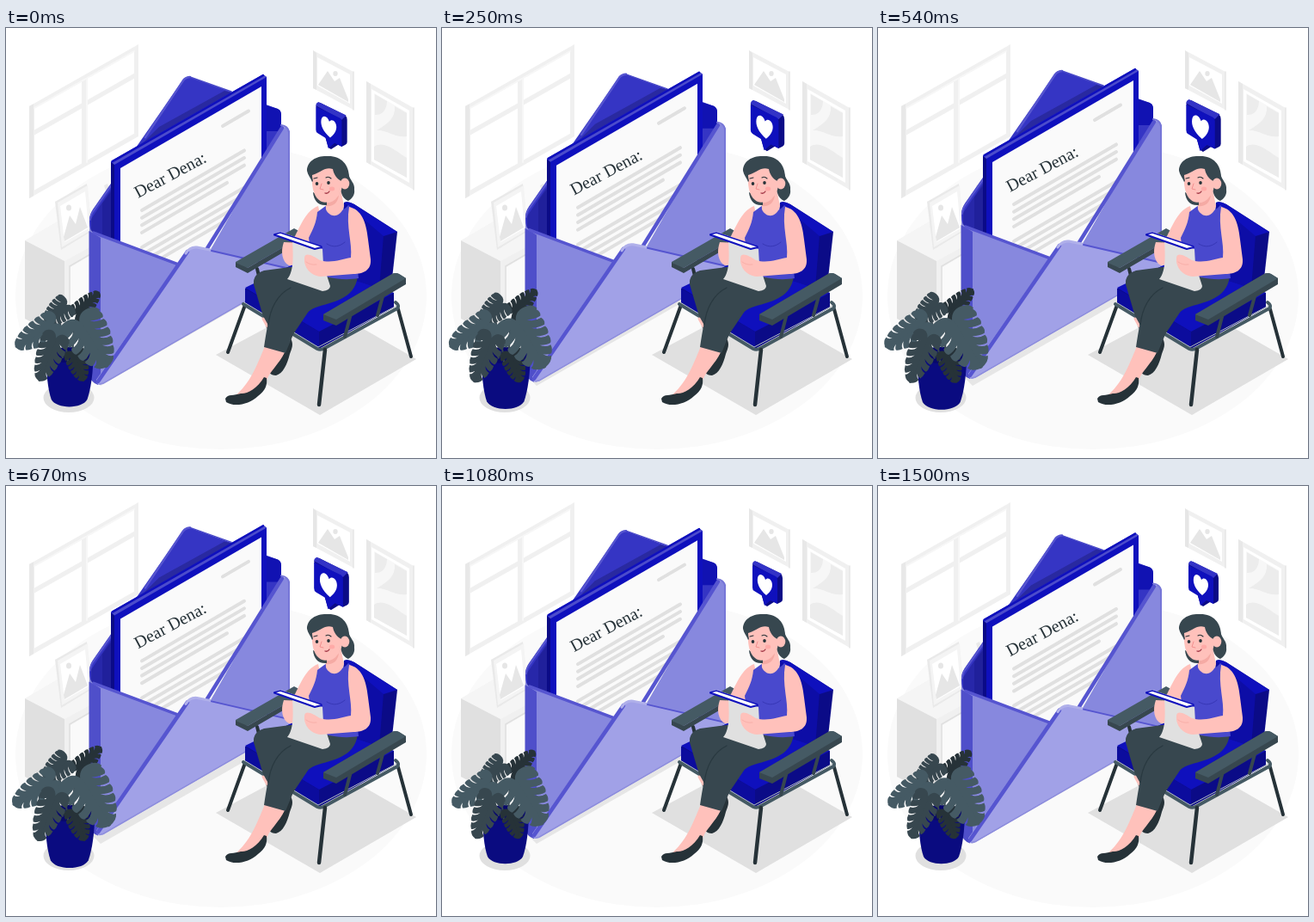
Animation, 500 px wide and 500 px high, one loop 1540 ms. Source, as an HTML page with a canvas:

```html
<!DOCTYPE html>
<html lang="en">
<head>
<meta charset="utf-8">
<title>Letter from an envelope</title>
<style>
  html, body { margin: 0; width: 100%; height: 100%; overflow: hidden; background: #fff; }
  canvas { display: block; }
</style>
</head>
<body>
<canvas id="stage" width="500" height="500"></canvas>
<script>
const ctx = document.getElementById('stage').getContext('2d');
const LOOP = 1540, PHASE = 40;
const SLATE = '#37474f', STEEL = '#455a64', INK = '#263238', SKIN = '#ffc1bb';
const BLUE = '#0f10bd', NAVY = '#0b0b87', EDGE = '#5655d0', PALE = '#8788de';
const GREY = '#e0e0e0', MIST = '#f0f0f0', PAPER = '#fafafa';

function fill(d, color) {
  ctx.fillStyle = color;
  ctx.fill(new Path2D(d));
}
function line(d, color, width) {
  ctx.strokeStyle = color;
  ctx.lineWidth = width;
  ctx.lineCap = ctx.lineJoin = 'round';
  ctx.stroke(new Path2D(d));
}
function oval(x, y, rx, ry, color) {
  ctx.fillStyle = color;
  ctx.beginPath();
  ctx.ellipse(x, y, rx, ry, 0, 0, Math.PI * 2);
  ctx.fill();
}
function moved(x, y, draw) {
  ctx.save();
  ctx.translate(x, y);
  draw();
  ctx.restore();
}
function scaled(x, y, k, draw) {
  ctx.save();
  ctx.translate(x, y);
  ctx.scale(k, k);
  ctx.translate(-x, -y);
  draw();
  ctx.restore();
}

// Wall panel whose horizontal edges rise at the isometric slope.
function panel(x0, x1, top, bottom, color) {
  const y = (x, base) => base - 0.567 * (x - 27);
  fill(`M${x0} ${y(x0, top)}L${x1} ${y(x1, top)}V${y(x1, bottom)}L${x0} ${y(x0, bottom)}Z`, color);
}

function room() {
  ctx.fillStyle = '#fff';
  ctx.fillRect(0, 0, 500, 500);
  oval(250, 312, 239, 178, PAPER);

  panel(27, 154, 91, 198, MIST);
  panel(27, 32, 91, 198, '#e8e8e8');
  for (const [x0, x1] of [[33, 88], [95, 149]]) {
    panel(x0, x1, 97, 122, '#fff');
    panel(x0, x1, 128, 192, '#fff');
  }
  line('M33 93L149 27M94 60V156', '#f7f7f7', 2);

  fill('M22 247L82 212L132 236L68 271Z', '#f5f5f5');
  fill('M22 247L68 271V362L22 338Z', GREY);
  fill('M68 271L132 236V340L68 362Z', MIST);
  line('M74 330V277L112 255', GREY, 1.5);
  fill('M75 278L112 256V325L75 340Z', PAPER);
  fill('M57 202L94 181L100 236L64 258Z', '#e9e9e9');
  fill('M60 203L95 183L99 235L65 255Z', '#f4f4f4');
  fill('M63 207L92 190L96 233L68 249Z', '#fff');
  fill('M67 243L74 218L81 228L86 208L95 232L68 248Z', '#e6e6e6');
  oval(73, 209, 3, 3.5, '#e6e6e6');
  fill('M114 183L118 181L124 199L120 202Z', '#e9e9e9');

  fill('M357 26L404 51V95L357 70Z', MIST);
  fill('M357 26L361 29V72L357 70Z', '#e6e6e6');
  fill('M362 34L400 54V88L362 67Z', '#fff');
  fill('M363 66L374 50L382 62L388 58L398 83V86Z', '#e6e6e6');
  oval(383, 53, 2.7, 3, '#e6e6e6');
  line('M404 51V95', '#e6e6e6', 1.5);

  fill('M419 62L474 93V188L419 156Z', MIST);
  fill('M419 62L424 65V159L419 156Z', '#e8e8e8');
  fill('M425 71L469 96V180L425 155Z', '#fff');
  fill('M428 76L466 98V174L428 153Z', '#f7f7f7');
  fill('M429 77L443 85C443 96 436 102 429 101Z', '#ececec');
  fill('M452 91L466 99V126C452 128 443 118 431 119C445 111 453 104 452 91Z', '#ececec');
  fill('M428 138C440 130 454 144 466 151V174L428 153Z', '#ececec');
  line('M474 93V188', '#e6e6e6', 1.5);

  fill('M98 404L110 416L283 317L275 300Z', '#e6e6e6');
  fill('M244 380L360 318L477 385L365 450Z', GREY);
  oval(73, 430, 29.5, 17, GREY);
}

function letter() {
  fill('M122 156Q122 154 125 153L299 54L303 57V190L210 285L122 248Z', BLUE);
  fill('M122 156L126 159V250L122 248Z', NAVY);
  fill('M122 155L299 54L303 57L126 159Z', '#4c4ccc');
  line('M124 155L299 55', BLUE, 2.5);
  fill('M133 163L297 68V230L225 290L133 252Z', PAPER);
  line('M252 114L282 96.5', GREY, 4);
  for (let row = 0; row < 9; row++) {
    if (row === 4) continue;
    const y = 212 + row * 8.6;
    const end = row === 3 ? 257 : 277;
    line(`M158 ${y}L${end} ${y - (end - 158) * 0.585}`, GREY, 4);
  }
  ctx.save();
  ctx.translate(153.5, 198);
  ctx.rotate(-28 * Math.PI / 180);
  ctx.font = '20px "Liberation Serif", "Times New Roman", serif';
  ctx.fillStyle = INK;
  ctx.fillText('Dear Dena:', 0, 0);
  ctx.restore();
}

function envelope() {
  fill('M97 224Q97 217 101 211L206 60Q209 56 214 57L316 94Q320 96 320 101V180L215 290L97 245Z', '#3535c4');
  line('M162 127L206 61Q209 57 214 57', EDGE, 2.5);
  line('M214 57L262 74', '#4949c8', 1.5);
  fill('M155 138L178 115L254 73L266 76L303 92V170H155Z', '#2929a0');
  fill('M303 90L316 94Q320 96 320 101V120H303Z', '#1112b2');
  fill('M99 222L124 185V250L99 240Z', '#2727a9');
  line('M98 223Q98 217 102 212L123 182', EDGE, 2);
  fill('M112 204L124 188V249L112 243Z', '#20209b');

  letter();

  fill('M97 225Q97 236 102 238L206 277L222 300L110 414Q97 412 97 402Z', PALE);
  fill('M96.500 222V402Q98 412 107 415L110 410V244Q104 240 96.500 236Z', '#4f4fca');
  line('M102 238L201 275', EDGE, 3.5);
  fill('M319 116Q327 113 330 120V291L225 280Z', PALE);
  line('M321 116L234 256', EDGE, 4.5);
  line('M320 113Q328 114 329 121V270', '#7676d7', 2);
  fill('M209 260Q213 254 221 255L239 259L330 280V288L113 414Q105 417 105 409Z', '#a1a1e7');
  line('M211 260L107 411', EDGE, 4.5);
  line('M209 262Q214 254 222 255L237 258', '#b0b0ea', 3);
  line('M239 259L330 280', EDGE, 2);
  line('M109 414L113 413L328 289', '#8d8ddd', 1.5);
}

// Split leaf running from its base to its tip, with narrow slits along both sides.
function leaf(x0, y0, x1, y1, width, color) {
  const half = u => 0.5 * Math.sqrt(1 - u * u);
  ctx.save();
  ctx.translate(x0, y0);
  ctx.rotate(Math.atan2(y1 - y0, x1 - x0));
  ctx.scale(Math.hypot(x1 - x0, y1 - y0), width);
  ctx.fillStyle = color;
  for (const side of [-1, 1]) {
    ctx.beginPath();
    ctx.moveTo(0, -0.03 * side);
    ctx.quadraticCurveTo(-0.24, 0.05 * side, -0.2, 0.3 * side);
    ctx.quadraticCurveTo(-0.18, 0.46 * side, -0.06, half(0.06) * side);
    for (let i = 0; i < 5; i++) {
      const a = i * 0.18 - 0.04, b = a + 0.145, mid = a + 0.09;
      ctx.lineTo(a, half(a) * 0.95 * side);
      ctx.quadraticCurveTo(mid, half(mid) * 1.06 * side, b, half(b) * 0.95 * side);
      ctx.quadraticCurveTo(b, half(b) * 0.7 * side, b - 0.07, half(b) * 0.4 * side);
      ctx.quadraticCurveTo(b + 0.035, half(b) * 0.6 * side, b + 0.035, half(b + 0.035) * 0.95 * side);
    }
    ctx.quadraticCurveTo(0.97, 0.2 * side, 1, 0);
    ctx.lineTo(1, -0.03 * side);
    ctx.fill();
  }
  ctx.restore();
}

function plant() {
  fill('M47 378H101C101 400 98 420 94 431C88 442 59 442 53 431C49 420 47 400 47 378Z', '#0a0b80');
  oval(74, 380, 27, 9, '#08086b');
  line('M72 388C70 365 66 355 62 341M76 386C80 360 76 345 84 332M66 383L57 364M78 386L91 345', SLATE, 2);
  leaf(83, 332, 108, 308, 23, INK);
  leaf(69, 324, 46, 343, 30, SLATE);
  leaf(53, 346, 12, 371, 34, STEEL);
  leaf(80, 380, 90, 410, 26, INK);
  leaf(87, 345, 117, 394, 54, STEEL);
  leaf(57, 364, 39, 410, 33, SLATE);
}

function bubble() {
  fill('M361 91L366 88L394 102Q396 104 396 107V132Q396 134 394 135L390 137L386 135L378 140L375 138Z', NAVY);
  fill('M361 91Q361 88 364 87L395 102L390 107Z', '#3333c6');
  fill('M361 92L388 105Q390 106 390 109V137L382 133L375 139L372 127.500L363 122Q361 121 361 118Z', BLUE);
  fill('M377 127C369 120 366 113 367 107C368 101 374 102 376 109C379 105 384 109 384 115C384 120 381 124 377 127Z', '#fff');
}

function chair() {
  line('M278 322L258 377M292 280L296 296', INK, 4);
  line('M456 327L471 382', INK, 4);
  fill('M393 203Q398 201 405 205L455 237L447 309L430 320L388 295Z', NAVY);
  fill('M393 203L439 241L434 303L420 312L388 290Z', '#0d0da6');
  fill('M393 203Q398 201 405 205L455 237L439 242Z', BLUE);

  fill('M267 272L335 233L348 240L281 279L267 277Z', STEEL);
  fill('M267 273L281 279L348 240V246L281 285L267 278Z', SLATE);

  fill('M278 303L340 272L451 308V325L364 373L278 323Z', NAVY);
  fill('M278 302L340 272L451 308L364 353Z', BLUE);
  fill('M278 303L364 353V373L278 323Z', '#0c0c9d');
  line('M276 321L362 373Q366 375 371 372L455 326Q458 323 453 319', STEEL, 4);
  line('M277 319L363 371L454 323', '#b4bec2', 1);
  line('M371 374L364 438', INK, 4.5);
}

function armrest() {
  line('M401 332L394 359M438 312L432 334', SLATE, 4);
  fill('M369 333L449 286Q453 284 457 286L465 291V298L384 346L369 340Z', SLATE);
  fill('M369 333L449 286Q453 284 457 286L465 291L384 339Z', STEEL);
}

function legs() {
  fill('M318 360L332 360L325 388L309 394Z', SKIN);
  fill('M331 361C335 368 332 373 330 379C327 391 322 402 314 404C307 404 304 400 305 393C317 391 324 380 331 361Z', INK);
  fill('M338 277L300 282Q287 286 288 298L303 349L330 362L365 310Z', SLATE);
  line('M304 347L299 338', SKIN, 3);
  fill('M301 370L324 377C318 391 305 400 302 413L281 431L266 428C284 413 291 394 301 370Z', SKIN);
  fill('M255 431C258 425 265 428 273 425C279 426 292 420 300 406L303 407C304 415 302 421 293 428C283 438 265 441 256 435Z', INK);
  fill('M409 289C405 316 380 318 360 325C341 332 334 358 325 378L300 371C303 352 306 329 315 315C322 303 345 298 358 283Z', SLATE);
  line('M331 302C315 310 307 327 305 345', '#293940', 1.3);
}

function torso() {
  fill('M363 207C349 212 343 229 335 244L351 250C362 238 368 224 363 207Z', SKIN);
  fill('M362 214L373 206C382 216 393 213 398 206C405 211 407 230 405 250L410 291C393 294 370 291 357 283L352 244C357 234 361 226 362 214Z', '#4949cd');
  line('M373 251C381 256 388 254 394 249', '#3737b6', 1);
  fill('M371 194L372 211C377 222 390 220 393 207L389 187Z', SKIN);
  fill('M372 203C379 204 384 199 387 194C386 204 380 208 372 207Z', '#f5aaa4');

  fill('M323 249C319 260 321 272 329 276L342 275L343 250Z', SKIN);
  fill('M333 247L368 257L369 275L377 300Q377 305 368 306L327 292C335 283 334 264 333 247Z', GREY);
  fill('M311 240L319 237L368 254L360 258Z', '#fff');
  line('M312 240L319 238L367 254', BLUE, 1.5);
  line('M312 240.500L359 257L367 255', BLUE, 2);

  fill('M399 208C413 211 419 225 421 246L424 269C425 282 415 286 404 286L366 289C354 288 346 278 347 268C347 260 356 264 365 270C378 274 390 269 401 267C403 250 395 231 399 208Z', SKIN);
  line('M349 272Q354 276 361 275', '#f5aaa4', 0.8);
}

function head() {
  fill('M384 165L398 169C400 178 406 180 405 188C406 194 402 199 398 201C393 199 390 195 389 187Z', SLATE);
  fill('M357 191C358 201 363 207 373 206L373 199Z', SLATE);
  fill('M356 168C355 182 357 195 364 200C371 207 386 200 390 188L393 175L380 160Z', SKIN);
  fill('M350 166C350 154 362 148 375 149C390 149 399 159 399 174L390 178C385 176 381 170 380 164C371 161 366 168 356 171C356 176 358 178 356 179C354 174 351 171 350 166Z', SLATE);
  oval(394, 181, 5.3, 6.5, SKIN);
  oval(361.5, 181, 1.8, 2.1, INK);
  oval(375, 180, 1.8, 2.1, INK);
  line('M358 175L362 174M372 174Q375 172 378 175', INK, 1.1);
  line('M367 181L365 187L369 188', '#f28f8f', 1);
  line('M371 192Q374 193 376 190', '#a23645', 1.3);
  oval(379, 187, 3.2, 2.5, '#ffaaa7');
}

function hover(t) {
  const p = ((t + PHASE) % LOOP) / LOOP;
  return 0.6 - 10 * (1 - Math.abs(2 * p - 1));
}

// Two linear beats followed by a rest; returns 0..1.
function beat(t) {
  const p = ((t + PHASE) % LOOP) / 1500;
  if (p < 0.28) return 1 - Math.abs(p / 0.14 - 1);
  if (p < 0.42) return (p - 0.28) / 0.14;
  return Math.max(0, (0.7 - p) / 0.28);
}

function draw(t) {
  const pulse = beat(t);
  room();
  moved(0, hover(t), envelope);
  scaled(69, 373, 1 + 0.09 * pulse, plant);
  scaled(378.5, 113.5, 1 + 0.2 * pulse, bubble);
  chair();
  legs();
  torso();
  head();
  armrest();
}

let start;
function tick(now) {
  start ??= now;
  draw((now - start) % LOOP);
  requestAnimationFrame(tick);
}
draw(0);
requestAnimationFrame(tick);
</script>
</body>
</html>
```
